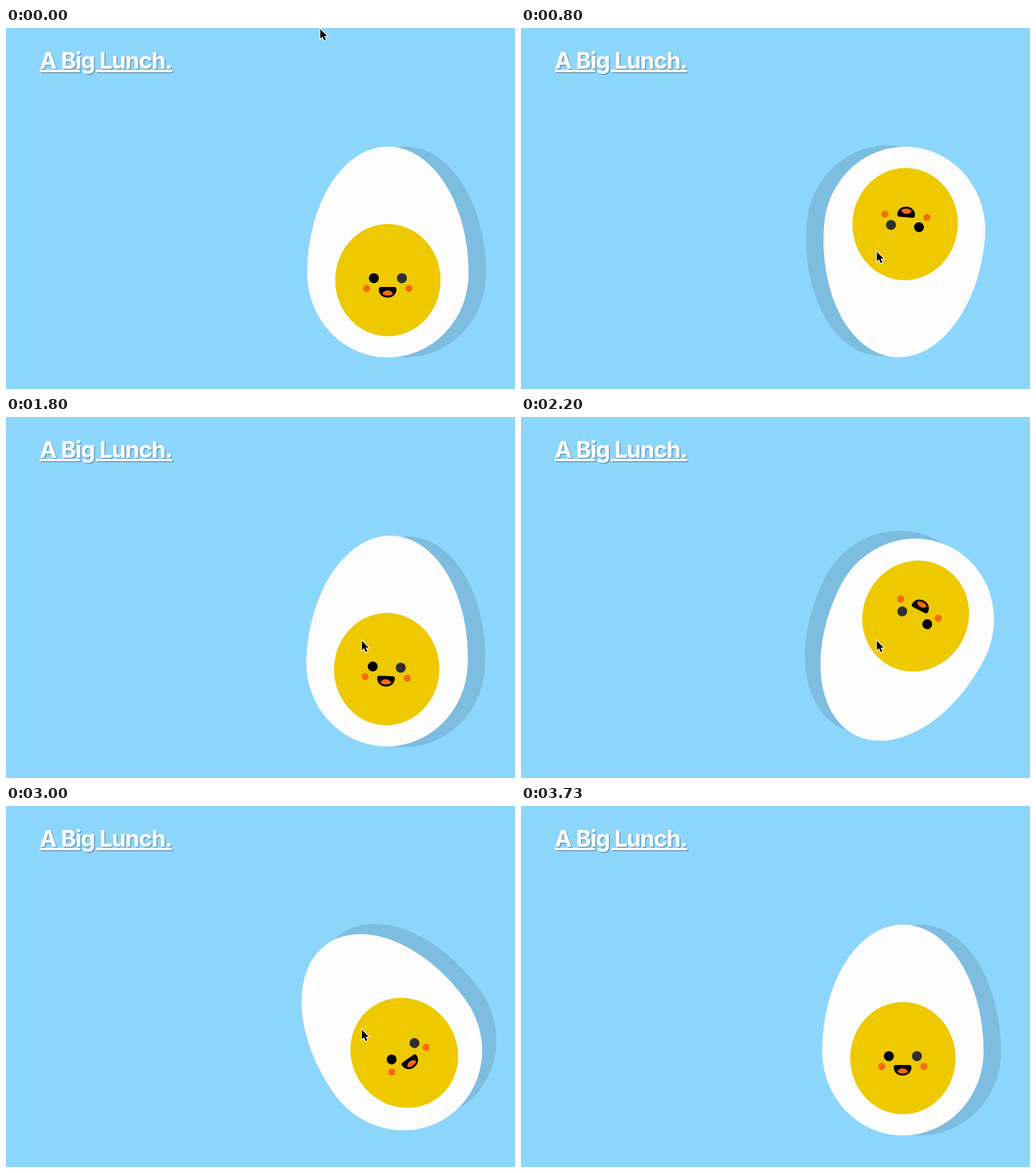
These frames come from a looping animation (889x630 px, 3.79 s). An HTML page:

```html
<!DOCTYPE html>
<html lang="en">
<head>
<meta charset="utf-8">
<title>Spinning egg</title>
<style>
  html, body { margin: 0; width: 100%; height: 100%; overflow: hidden; background: #8dd6fb; }
  svg { position: absolute; left: 0; top: 0; }
  h1 {
    position: absolute; left: 59px; top: 33px; margin: 0; white-space: nowrap;
    font: 700 40px/48px Inter, sans-serif; letter-spacing: -1.2px; color: #fff;
    text-decoration: underline 4px; text-underline-offset: 1.5px;
    text-shadow: 2px 2px rgba(0, 0, 0, .25);
  }
</style>
</head>
<body>
<h1>A Big Lunch.</h1>
<svg width="889" height="630" viewBox="0 0 889 630">
  <defs>
    <path id="shell" d="M526 428A141 221 0 0 1 808 428A141 147 0 0 1 526 428Z"/>
  </defs>
  <g id="egg">
    <use href="#shell" x="30.500" fill="#7dbde0"/>
    <use href="#shell" fill="#fcfcfc"/>
    <ellipse cx="667" cy="440" rx="92" ry="98" fill="#eec900"/>
    <circle cx="642.5" cy="436.500" r="8.700"/>
    <circle cx="691.5" cy="436.500" r="8.700" fill="#2f2f2f"/>
    <g fill="#f56a12">
      <circle cx="630" cy="454.500" r="6.200"/>
      <circle cx="703.7" cy="454.500" r="6.200"/>
    </g>
    <path d="M655 452H678Q682 452 682 456C682 465 675 470.500 666.500 470.500S651 465 651 456Q651 452 655 452Z"/>
    <path d="M657.500 463.500C660 456 673 456 675.500 463.500C673 468 660 468 657.500 463.500Z" fill="#f56a12"/>
  </g>
  <path id="cursor" d="M0 0V16.500L3.800 12.900L6.800 19.800L9.600 18.600L6.700 11.900H12Z"
        stroke="#fff" stroke-width="2.400" paint-order="stroke"/>
</svg>
<script>
  const LOOP = 3790, TURN = 680, SPIN_START = 430, SPIN_END = 3530;
  // One turn: [ms, degrees], slowing down at each half turn
  const turn = [[0, 0], [18, 4], [35, 32], [60, 70], [110, 118], [160, 148], [230, 170],
    [310, 179], [370, 184], [410, 206], [450, 248], [490, 292], [530, 324],
    [590, 348], [650, 358], [680, 360]];

  const egg = document.getElementById('egg');
  const cursor = document.getElementById('cursor');
  const mix = (a, b, k) => a + (b - a) * k;
  const ease = (t, from, to) => {
    const k = Math.min(1, Math.max(0, (t - from) / (to - from)));
    return k * k * (3 - 2 * k);
  };

  function angleAt(t) {
    if (t < SPIN_START || t >= SPIN_END) return 0;
    const p = (t - SPIN_START) % TURN;
    const i = turn.findIndex(([ms]) => ms > p);
    const [t0, a0] = turn[i - 1], [t1, a1] = turn[i];
    return mix(a0, a1, (p - t0) / (t1 - t0));
  }

  function draw(now) {
    const t = now % LOOP;
    const enter = ease(t, 60, 580), leave = ease(t, 3300, 3660);
    const x = mix(549, 621.5, enter) - 20 * leave;
    const y = mix(2, 390.5, enter) + 255 * leave;
    egg.setAttribute('transform', `rotate(${angleAt(t)} 667 391)`);
    cursor.setAttribute('transform', `translate(${x} ${y})`);
  }

  const start = performance.now();
  function tick() {
    draw(performance.now() - start);
    requestAnimationFrame(tick);
  }
  tick();
</script>
</body>
</html>
```
